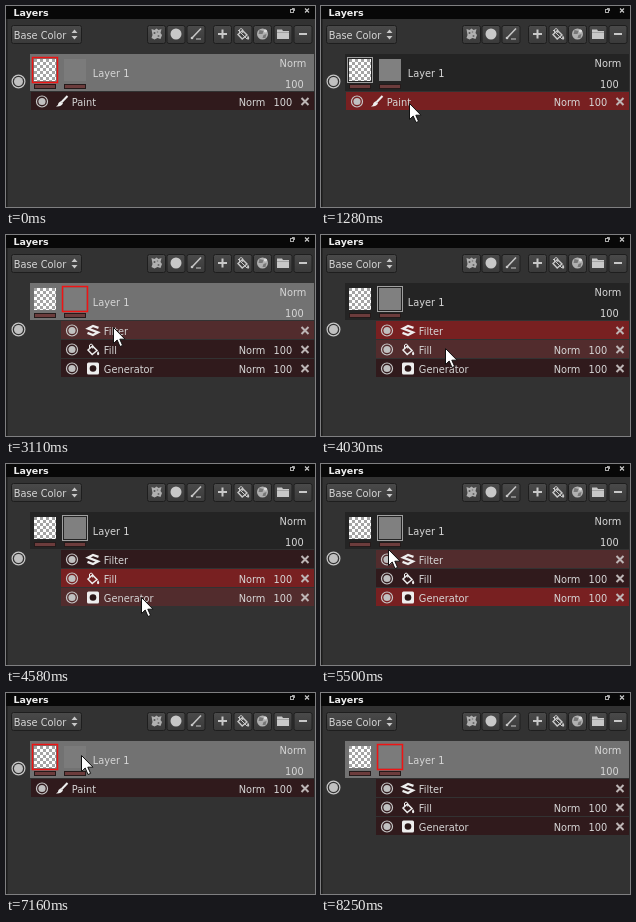
An HTML page that plays this animation: 309 px wide and 201 px high, repeating every 8.62 s.

```html
<!DOCTYPE html>
<html lang="en">
<head>
<meta charset="utf-8">
<title>Layers panel</title>
<style>
html, body { margin: 0; width: 100%; height: 100%; overflow: hidden; background: #323232; }
svg { display: block; width: 100vw; height: 100vh; }
text { font: 9.8px "DejaVu Sans", Verdana, sans-serif; fill: #d6d6d6; white-space: pre; }
.title { font-size: 9.5px; font-weight: bold; fill: #eee; }
</style>
</head>
<body>
<svg id="stage" viewBox="0 0 309 201" preserveAspectRatio="none">
  <defs>
    <pattern id="checks" x="28" y="53" width="6" height="6" patternUnits="userSpaceOnUse">
      <path fill="#fff" d="M0 0h6v6H0z"/>
      <path fill="#a4a4a4" d="M0 0h3v3H0zM3 3h3v3H3z"/>
    </pattern>
    <linearGradient id="raised" x2="0" y2="1">
      <stop stop-color="#4a4a4a"/><stop offset="1" stop-color="#3a3a3a"/>
    </linearGradient>
  </defs>
  <g id="chrome"></g>
  <g id="list"></g>
  <path id="cursor" fill="#fff" stroke="#111" stroke-width="1"
    d="M.5 .5V16.5L4.2 13L7 19.5L9.6 18.4L6.8 12.2H12Z"/>
</svg>
<script>
const LOOP = 8620;
const LIGHT = '#c8c8c8';

// [ms, cursor x, cursor y, view, selection]; x < 0 hides the cursor
const STEPS = [
  [0, -1, 0, 'content', 'layer'],
  [550, 118, 144, 'content', 'layer'],
  [730, 104, 122, 'content', 'layer'],
  [920, 93, 104, 'content', 'layer'],
  [1100, 88, 97, 'content', 'layer'],
  [1280, 88, 97, 'content', 0],
  [1650, 86, 92, 'content', 0],
  [1830, 81, 78, 'content', 0],
  [2010, 77, 66, 'content', 0],
  [2190, 75, 62, 'content', 0],
  [2370, 75, 62, 'mask', 'layer'],
  [2740, 83, 71, 'mask', 'layer'],
  [2920, 97, 85, 'mask', 'layer'],
  [3110, 107, 92, 'mask', 'layer'],
  [3480, 107, 92, 'mask', 0],
  [3660, 112, 97, 'mask', 0],
  [3840, 120, 107, 'mask', 0],
  [4030, 124, 113, 'mask', 0],
  [4210, 124, 113, 'mask', 1],
  [4390, 130, 126, 'mask', 1],
  [4580, 135, 133, 'mask', 1],
  [4950, 135, 133, 'mask', 2],
  [5320, 104, 113, 'mask', 2],
  [5500, 67, 85, 'mask', 2],
  [5680, 48, 69, 'mask', 2],
  [5860, 40, 62, 'mask', 2],
  [6230, 40, 62, 'content', 'layer'],
  [6790, 50, 62, 'content', 'layer'],
  [6970, 66, 62, 'content', 'layer'],
  [7160, 75, 62, 'content', 'layer'],
  [7340, 75, 62, 'mask', 'layer'],
  [7710, 78, 86, 'mask', 'layer'],
  [7890, 84, 122, 'mask', 'layer'],
  [8070, 94, 180, 'mask', 'layer'],
  [8250, -1, 0, 'mask', 'layer'],
];

const ROWS = { content: ['Paint'], mask: ['Filter', 'Fill', 'Generator'] };
const ROW_TOP = 86, ROW_PITCH = 19;

const rect = (x, y, w, h, fill, extra = '') =>
  `<rect x="${x}" y="${y}" width="${w}" height="${h}" fill="${fill}" ${extra}/>`;
const frame = (x, y, w, h, color, weight = 1) =>
  rect(x, y, w, h, 'none', `stroke="${color}" stroke-width="${weight}"`);
const raised = (x, w) =>
  rect(x, 19.5, w, 18, 'url(#raised)', 'rx="2" stroke="#1e1e1e"');
const disc = (x, y, r, fill, extra = '') =>
  `<circle cx="${x}" cy="${y}" r="${r}" fill="${fill}" ${extra}/>`;
const line = (d, weight = 1, color = LIGHT) =>
  `<path d="${d}" fill="none" stroke="${color}" stroke-width="${weight}"/>`;
const shape = (d, fill = LIGHT) => `<path d="${d}" fill="${fill}"/>`;
const label = (x, y, s, cls = '') => `<text x="${x}" y="${y}" class="${cls}">${s}</text>`;
const at = (x, y, body) => `<g transform="translate(${x} ${y})">${body}</g>`;
const eye = (x, y, r) =>
  disc(x, y, r, 'none', `stroke="${LIGHT}" stroke-width="1.2"`) + disc(x, y, r - 1.9, '#c0c0c0');

const bucket = (color, weight) =>
  line('M-3.5 -1V-4.5Q-2 -6.5 -.3 -4.5V-1', 1, color) +
  line('M-5 .5L-.5 -3.5L4 1L-.8 5Z', weight, color) +
  shape('M5 1.5Q7.5 5 5 5.8Q3 5 5 1.5Z', color);

// Icons are drawn around their own centre.
const ROW_ICONS = {
  Paint: line('M5.5 -5.5L-.5 .8', 2, '#eee') + shape('M-1.5 -.3L1 2Q-1 5.5 -6 5Q-3.5 3.5 -3.5 1.5Z', '#eee'),
  Filter: line('M5.5 -2.6L0 -4.6L-5 -2L5 2L0 4.6L-5.5 2.4', 2.3, '#eee'),
  Fill: bucket('#eee', 1.5),
  Generator: rect(-6, -6, 12, 12, '#eee', 'rx="1.5"') + disc(0, 0, 3.3, '#2b1718'),
};

const TOOLS = [
  [150.5, shape('M-5 -5L-2 -4L0 -5.5L2 -4L5 -5L4 -1L5.5 1L4 5L1 4L-2 5.5L-5 4L-4 1Z', '#b0b0b0') +
    disc(-2, -1, 1, '#555') + disc(2, 2, 1, '#666') + disc(1, -2, .8, '#777')],
  [170, disc(0, 0, 5.5, '#c8c8c8')],
  [190, line('M5 -5.5L-4 4', 1.5) + line('M0 5H5', 1) + disc(-4, 4, 1.3, LIGHT)],
  [216.5, line('M-4.5 0H4.5M0 -4.5V4.5', 2)],
  [237, bucket(LIGHT, 1.4) + line('M-5 -4L4 5', 1)],
  [256.5, disc(0, 0, 5.5, '#b0b0b0') + shape('M-3 -4L1 -3L0 0L-4 0ZM1 1L4 0L3 4L0 4Z', '#777') +
    disc(3, -3, 1.6, '#ddd')],
  [277, shape('M-6 -4.5H-1L0 -3H6V5H-6Z') + line('M-6 -1.5H6', .6, '#8b8b8b')],
  [297, line('M-4 0H4', 2)],
];

function drawChrome() {
  return rect(0, 0, 309, 201, '#323232') +
    rect(0, 0, 309, 13, '#080808') +
    rect(0, 13, 1.5, 188, '#1b1b1b') +
    label(7.5, 10, 'Layers', 'title') +
    frame(284.5, 3.5, 3, 3, '#aaa') + line('M286 2.5H288.5V5', 1, '#aaa') +
    line('M299 2.5L303 6.5M303 2.5L299 6.5', 1.1, '#ccc') +
    raised(5.5, 70) +
    label(7.7, 33, 'Base Color') +
    shape('M65.5 27L68.5 23.5L71.5 27ZM65.5 30L68.5 33.5L71.5 30Z') +
    TOOLS.map(([x, icon]) => raised(x - 9, 18) + at(x, 28, icon)).join('');
}

function drawLayer(view, selected, hovered) {
  const fill = selected ? '#727272' : hovered ? '#444' : '#242424';
  const thumbX = view === 'mask' ? 56.5 : 26.5;
  const bar = x => rect(x + .5, 78.5, 21, 4, '#6c3c3c', 'stroke="#241a1a"');
  return rect(24, 48, 284, 37, fill) +
    rect(28, 53, 22, 22, 'url(#checks)') +
    rect(58, 53, 22, 22, selected ? '#7b7b7b' : '#808080') +
    frame(thumbX, 51.5, 25, 25, selected ? '#f01414' : '#a0a0a0', selected ? 1.5 : 1) +
    bar(28) + bar(58) +
    label(86.8, 71, 'Layer 1') + label(273.6, 61, 'Norm') + label(279, 82, '100');
}

function drawRow(name, i, left, selected, hovered) {
  const top = ROW_TOP + i * ROW_PITCH, mid = top + 9.5;
  const fill = selected ? '#782021' : hovered ? '#522c2d' : '#301a1c';
  const iconX = left + (name === 'Paint' ? 31 : 32);
  const textX = name === 'Paint' ? 65.8 : 97.8;
  return rect(left, top, 308 - left, 18, fill) +
    eye(left + 11, mid, 5.5) + at(iconX, mid, ROW_ICONS[name]) +
    label(textX, top + 14, name) +
    (name === 'Filter' ? '' : label(232.7, top + 14, 'Norm') + label(267.5, top + 14, '100')) +
    line(`M295.5 ${mid - 3.5}l7 7m0 -7l-7 7`, 2, '#bdb5b5');
}

function drawList(x, y, view, selection) {
  const left = view === 'mask' ? 55 : 25;
  const names = ROWS[view];
  const overLayer = x >= 24 && y >= 48 && y < 85;
  const overRow = x >= left && y >= 85 ? Math.max(0, Math.floor((y - ROW_TOP) / ROW_PITCH)) : -1;
  return eye(12.5, view === 'mask' ? 94.5 : 75.5, 6.4) +
    drawLayer(view, selection === 'layer', overLayer) +
    names.map((name, i) => drawRow(name, i, left, selection === i, overRow === i)).join('');
}

const byId = id => document.getElementById(id);
const list = byId('list'), cursor = byId('cursor');
byId('chrome').innerHTML = drawChrome();

const start = performance.now();
let shown = null;

function tick() {
  const t = (performance.now() - start) % LOOP;
  const step = STEPS.findLast(([ms]) => ms <= t);
  if (step !== shown) {
    shown = step;
    const [, x, y, view, selection] = step;
    list.innerHTML = drawList(x, y, view, selection);
    cursor.setAttribute('visibility', x < 0 ? 'hidden' : 'visible');
    cursor.setAttribute('transform', `translate(${x} ${y})`);
  }
  requestAnimationFrame(tick);
}
tick();
</script>
</body>
</html>
```
